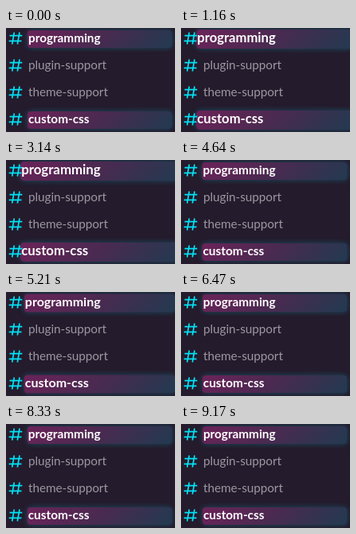
These frames come from a looping animation (212x131 px, 9430 ms). An HTML page:

```html
<!DOCTYPE html>
<html lang="en">
<head>
<meta charset="utf-8">
<style>
  html, body { margin: 0; width: 100%; height: 100%; overflow: hidden; background: #241b2c; }
  #stage { position: relative; width: 100%; height: 100%; overflow: hidden; contain: strict; }
  .row { position: absolute; left: 0; width: 100%; height: 29px; }
  .row svg { position: absolute; left: 2px; top: 3px; width: 20px; height: 20px; fill: none; stroke: #02e2f6; stroke-width: 2; }
  .name {
    position: absolute; left: 27px; top: 3px; width: 181px; height: 22px; padding-left: 1px;
    box-sizing: border-box; border-radius: 4px; white-space: nowrap;
    font: 400 15.3px/19px Lato, "Open Sans", sans-serif; letter-spacing: -.05px; color: #9b97a0;
  }
  .unread .name {
    font-weight: 700; letter-spacing: 0; color: #fff;
    background: linear-gradient(135deg, #6b2359, #492a50 50%, #223a50);
    box-shadow: 0 0 7px rgba(0, 200, 230, .3);
  }
</style>
</head>
<body>
<div id="stage"></div>
<script>
  const LOOP = 9430, START = 900, PERIOD = 1852, HALF = 463, GROWTH = 0.1;
  const channels = [["programming", true], ["plugin-support"], ["theme-support"], ["custom-css", true]];

  document.getElementById("stage").innerHTML = channels.map(([name, unread], i) => `
    <div class="row ${unread ? "unread" : ""}" style="top:${i * 34}px">
      <div class="name">${name}</div>
      <svg viewBox="0 0 24 24"><path d="M3 8H22M2 16H21M10 3L6.8 21M18 3L14.8 21"/></svg>
    </div>`).join("");
  const pulsing = document.querySelectorAll(".unread .name");

  // The CSS "ease" curve, cubic-bezier(.25, .1, .25, 1)
  function ease(x) {
    const bezier = (a, b, t) => 3 * a * t * (1 - t) ** 2 + 3 * b * t * t * (1 - t) + t ** 3;
    let low = 0, high = 1;
    for (let i = 0; i < 20; i++) {
      const mid = (low + high) / 2;
      if (bezier(.25, .25, mid) < x) low = mid; else high = mid;
    }
    return bezier(.1, 1, low);
  }

  function pulse(ms) {
    const t = ms < START ? -1 : (ms - START) % PERIOD;
    if (t < 0 || t >= 2 * HALF) return 0;
    return t < HALF ? ease(t / HALF) : 1 - ease(t / HALF - 1);
  }

  function draw() {
    const amount = pulse(performance.now() % LOOP);
    pulsing.forEach(el => el.style.transform = amount ? `scale(${1 + GROWTH * amount})` : "none");
    requestAnimationFrame(draw);
  }
  draw();
</script>
</body>
</html>
```
